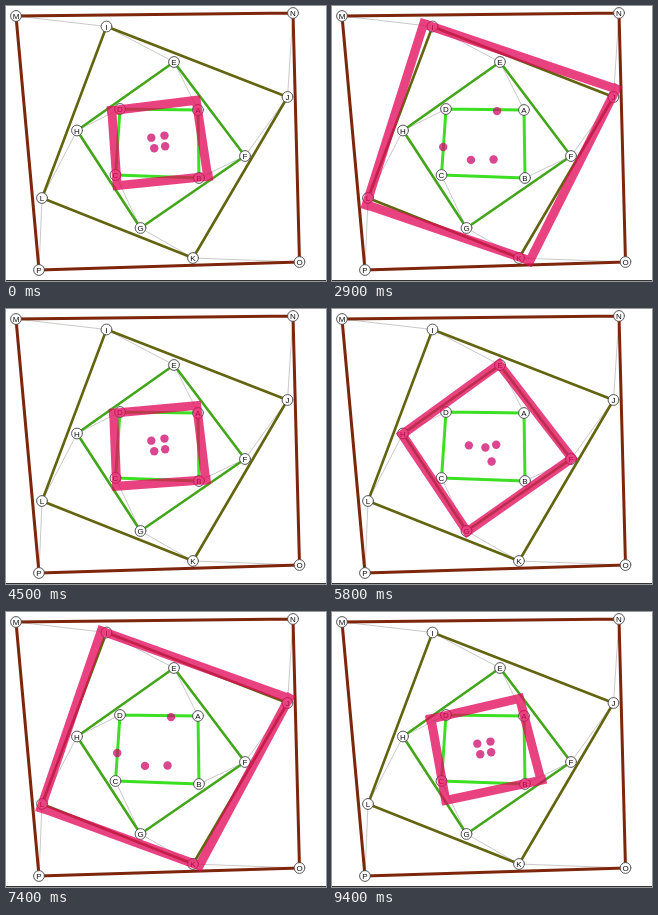
Recreate the animation shown at these times as an HTML page with a canvas. Size 320 by 275 pixels, loop 9.5 s.

```html
<!DOCTYPE html>
<html>
<head>
<meta charset="utf-8">
<style>
html, body { margin: 0; height: 100%; overflow: hidden; background: #fff; }
canvas { display: block; }
</style>
</head>
<body>
<canvas id="stage" width="320" height="275"></canvas>
<script>
const ctx = document.getElementById('stage').getContext('2d');
const LOOP = 9500, STEP = 100, START = 0.215, RATE = 0.0656;

// Nested quadrilaterals, innermost first
const quads = [
  { names: 'ABCD', color: '#3cdf22', width: 3, pts: [[192, 104], [193, 172], [109.5, 169], [114, 103]] },
  { names: 'EFGH', color: '#42a51a', width: 2.6, pts: [[168, 56], [239, 150], [134.5, 222], [71, 124.5]] },
  { names: 'IJKL', color: '#63640f', width: 2.6, pts: [[100.5, 20.5], [281.5, 91], [187, 252], [36, 192]] },
  { names: 'MNOP', color: '#7d260b', width: 3, pts: [[10, 10], [287, 7], [293.5, 256], [33, 264]] }
];

// Spiral similarity that carries segment ab onto segment cd
function spiral(a, b, c, d) {
  const ux = b[0] - a[0], uy = b[1] - a[1], vx = d[0] - c[0], vy = d[1] - c[1];
  const n = ux * ux + uy * uy;
  const re = (vx * ux + vy * uy) / n, im = (vy * ux - vx * uy) / n;
  const px = c[0] - re * a[0] + im * a[1], py = c[1] - re * a[1] - im * a[0];
  const qx = 1 - re, m = qx * qx + im * im;
  return {
    a, b,
    center: [(px * qx - py * im) / m, (py * qx + px * im) / m],
    scale: Math.hypot(re, im),
    angle: Math.atan2(im, re)
  };
}

function turn({ center: [cx, cy], scale, angle }, [x, y], t) {
  const k = scale ** t, c = k * Math.cos(angle * t), s = k * Math.sin(angle * t);
  return [cx + c * (x - cx) - s * (y - cy), cy + s * (x - cx) + c * (y - cy)];
}

const stages = [0, 1, 2].map(k => {
  const p = quads[k].pts, q = quads[k + 1].pts;
  return p.map((a, i) => spiral(a, p[(i + 1) % 4], q[i], q[(i + 1) % 4]));
});

function strokeSegments(segments, color, width, cap) {
  ctx.beginPath();
  for (const [a, b] of segments) {
    ctx.moveTo(...a);
    ctx.lineTo(...b);
  }
  ctx.strokeStyle = color;
  ctx.lineWidth = width;
  ctx.lineCap = cap;
  ctx.stroke();
}

function disc([x, y], r, fill) {
  ctx.beginPath();
  ctx.arc(x, y, r, 0, 2 * Math.PI);
  ctx.fillStyle = fill;
  ctx.fill();
}

function drawFigure() {
  ctx.fillStyle = '#fff';
  ctx.fillRect(0, 0, 320, 275);
  ctx.fillStyle = '#333';
  ctx.fillRect(0, 274, 320, 1);
  for (let k = 0; k < 3; k++)
    strokeSegments(quads[k].pts.map((p, i) => [p, quads[k + 1].pts[i]]), '#bbb', 0.8, 'butt');
  for (const { pts, color, width } of quads)
    strokeSegments(pts.map((p, i) => [p, pts[(i + 1) % 4]]), color, width, 'round');
  ctx.font = '8px "Liberation Sans", Arial, sans-serif';
  ctx.textAlign = 'center';
  for (const { names, pts } of quads) {
    pts.forEach((p, i) => {
      disc(p, 5.4, '#fff');
      ctx.strokeStyle = '#444';
      ctx.lineWidth = 0.9;
      ctx.stroke();
      ctx.fillStyle = '#111';
      ctx.fillText(names[i], p[0], p[1] + 3);
    });
  }
}

function draw(time) {
  const phase = START + RATE * Math.floor(time % LOOP / STEP);
  const stage = stages[Math.floor(phase) % 3], t = phase % 1;
  drawFigure();
  const bars = stage.map(s => [turn(s, s.a, t), turn(s, s.b, t)]);
  strokeSegments(bars, 'rgba(226, 10, 92, 0.77)', 9, 'square');
  for (const s of stage) disc(s.center, 4.2, 'rgba(208, 14, 110, 0.77)');
}

const begin = performance.now();
function tick() {
  draw(performance.now() - begin);
  requestAnimationFrame(tick);
}
tick();
</script>
</body>
</html>
```
